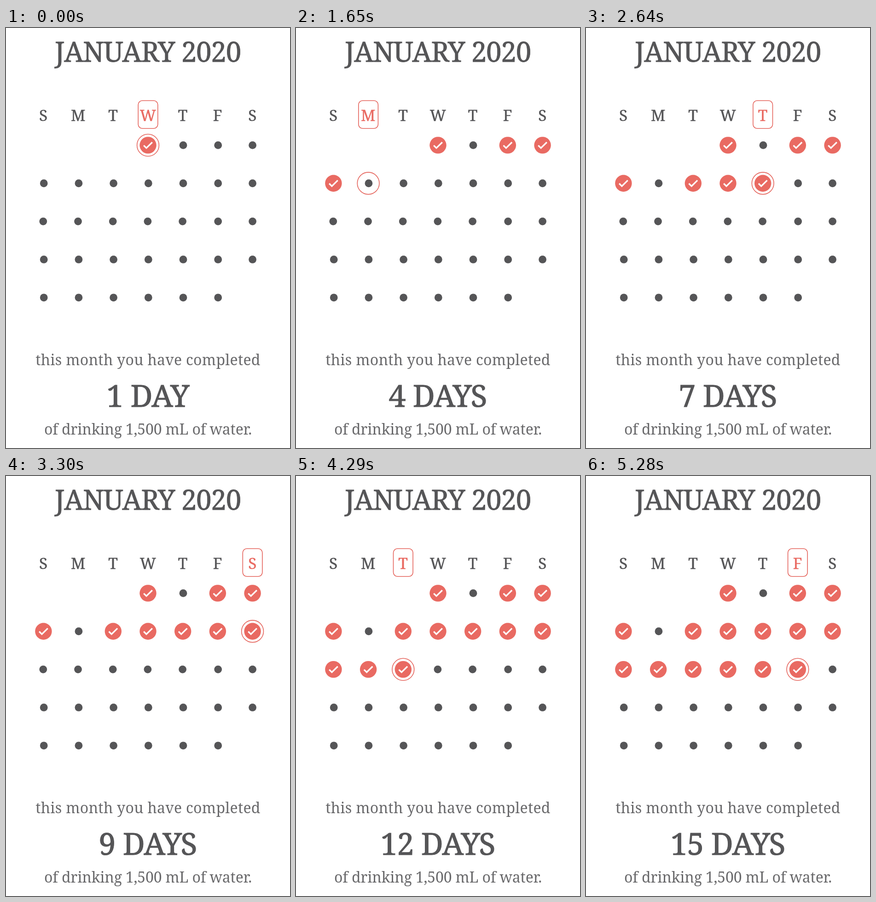
An HTML page that plays this animation: 617x908 px, repeating every 5610 ms.

```html
<!DOCTYPE html>
<html lang="en">
<head>
<meta charset="utf-8">
<title>Water calendar</title>
<style>
  html, body { margin: 0; width: 100%; height: 100%; overflow: hidden; background: #fff; }
  svg { display: block; width: 617px; height: 908px; }
  text { font-family: "Noto Serif", serif; fill: #555557; stroke: #555557; stroke-width: 0; text-anchor: middle; }
  /* A thin outline thickens the hairlines towards a slab serif. */
  .title { font-size: 60px; letter-spacing: -1.2px; stroke-width: .8px; }
  .weekday { font-size: 33.5px; stroke-width: .5px; }
  .note { font-size: 32px; font-weight: 300; fill: #69696b; }
  .total { font-size: 66px; letter-spacing: -.9px; stroke-width: 1.1px; }
  .dot { fill: #555557; }
  .disc { fill: #e96a62; }
  .tick { fill: none; stroke: #fff; stroke-width: 3.3; }
  .outline { fill: none; stroke: #e5655d; stroke-width: 1.6; }
  .weekday.on { fill: #e96a62; stroke: #e96a62; }
</style>
</head>
<body>
<svg id="stage" viewBox="0 0 617 908">
  <text class="title" x="308" y="73">JANUARY 2020</text>
  <text class="note" x="308.5" y="729" letter-spacing=".28">this month you have completed</text>
  <text class="total" id="total" x="308" y="819"></text>
  <text class="note" x="308.5" y="879" letter-spacing="-.2">of drinking 1,500 mL of water.</text>
  <rect class="outline" id="box" y="157" width="42.6" height="60.2" rx="9"/>
  <circle class="outline" id="ring" r="23.9"/>
</svg>
<script>
const STEP = 330, STEPS = 17, FIRST_COL = 3, DAYS = 31;
const missed = [2, 6];
const stage = document.getElementById("stage");
const [total, box, ring] = ["total", "box", "ring"].map(id => document.getElementById(id));

function add(tag, attrs, parent = stage) {
  const el = document.createElementNS("http://www.w3.org/2000/svg", tag);
  for (const key in attrs) el.setAttribute(key, attrs[key]);
  return parent.appendChild(el);
}

const colX = col => 81.4 + 75.7 * col;
const rowY = row => 253.4 + 82.35 * row;

function place(day) {
  const cell = day - 1 + FIRST_COL;
  return { col: cell % 7, row: Math.floor(cell / 7) };
}

// The third row and the last column sit slightly to the left.
function dotX(col, row) {
  const nudge = col === 6 ? 0.8 : row === 2 && col < 5 ? 1.4 : 0;
  return 82.2 + 75.7 * col - nudge;
}

const weekdays = [..."SMTWTFS"].map((letter, col) => {
  const el = add("text", { class: "weekday", x: colX(col) - 0.3, y: 201 });
  el.textContent = letter;
  return el;
});

const cells = Array.from({ length: DAYS }, (_, i) => {
  const { col, row } = place(i + 1);
  const dot = add("circle", { class: "dot", cx: dotX(col, row), cy: rowY(row), r: 8.4 });
  const check = add("g", { transform: `translate(${colX(col)} ${rowY(row)})` });
  add("circle", { class: "disc", r: 18.2 }, check);
  add("path", { class: "tick", d: "M-9.3 .5L-3.5 6.1L9.3 -6.4" }, check);
  return { dot, check };
});

function show(today) {
  const { col, row } = place(today);
  let count = 0;
  cells.forEach(({ dot, check }, i) => {
    const done = i < today && !missed.includes(i + 1);
    count += done;
    dot.style.display = done ? "none" : "";
    check.style.display = done ? "" : "none";
  });
  weekdays.forEach((el, i) => el.classList.toggle("on", i === col));
  box.setAttribute("x", colX(col) - 21.3);
  ring.setAttribute("cx", colX(col));
  ring.setAttribute("cy", rowY(row));
  total.textContent = `${count} DAY${count > 1 ? "S" : ""}`;
}

let start, shown;
function tick(now) {
  start ??= now;
  const today = Math.floor((now - start) / STEP) % STEPS + 1;
  if (today !== shown) show(shown = today);
  requestAnimationFrame(tick);
}
show(1);
requestAnimationFrame(tick);
</script>
</body>
</html>
```
